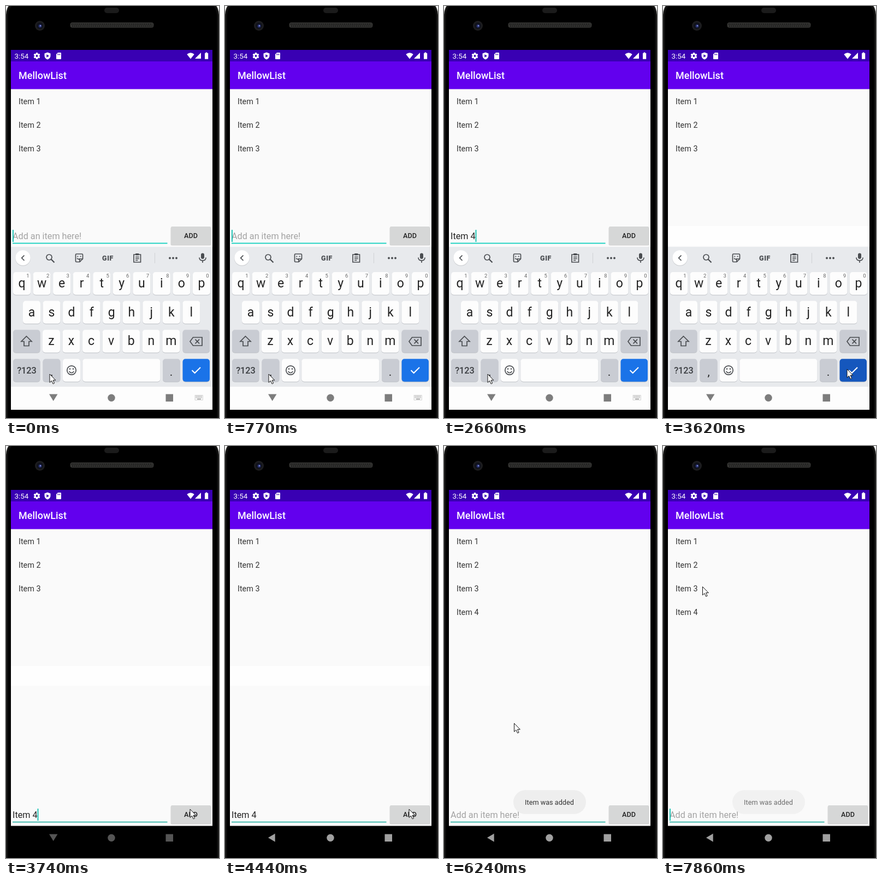
Write an HTML page that moves like this. It is 390x751 px and loops after 8 s.

```html
<!DOCTYPE html>
<html lang="en">
<head>
<meta charset="utf-8">
<title>To-do list demo</title>
<style>
  html, body { margin: 0; width: 100%; height: 100%; overflow: hidden; background: #000; }
  svg { display: block; width: 390px; height: 751px; font-family: Roboto, "Open Sans", sans-serif; }
  text { white-space: pre; }
  .mid { text-anchor: middle; }
  .line { fill: none; stroke: #4a4d51; stroke-width: 1.7; }
</style>
</head>
<body>
<svg id="stage" viewBox="0 0 390 751"></svg>
<script>
const LOOP = 8000;
const FIELD_DROP = 253;

const rect = (x, y, w, h, fill, extra = '') =>
  `<rect x="${x}" y="${y}" width="${w}" height="${h}" fill="${fill}" ${extra}/>`;
const circle = (x, y, r, fill, extra = '') =>
  `<circle cx="${x}" cy="${y}" r="${r}" fill="${fill}" ${extra}/>`;
const path = (d, extra = 'class="line"') => `<path d="${d}" ${extra}/>`;
const text = (x, y, size, fill, str, extra = '') =>
  `<text x="${x}" y="${y}" font-size="${size}" fill="${fill}" ${extra}>${str}</text>`;
const group = (id, body, extra = '') => `<g id="${id}" ${extra}>${body}</g>`;
const MID = 'class="mid"';
const MID_BOLD = 'class="mid" font-weight="500"';

function phone() {
  return rect(0, 0, 390, 751, '#f4f4f4')
    + rect(0, -14, 390, 800, '#1f1f1d', 'rx="30"')
    + rect(1.5, -12, 387, 800, '#0c0c0c', 'rx="29"')
    + rect(4, -10, 382, 800, '#000', 'rx="28"')
    + rect(180, 3, 27, 10, '#1b1b1b', 'rx="5"')
    + circle(62, 36, 9, '#1d1d1f') + circle(62, 36, 6, '#10121c')
    + circle(62.5, 36.5, 3, '#26306e') + circle(63, 36, 1.2, '#8b93d8')
    + rect(117.5, 30, 153, 9.5, '#343432', 'rx="4"')
    + path('M120 33H268M121 36.5H269', 'stroke="#171717" stroke-width="2" stroke-dasharray="2 1.5"');
}

function statusBar() {
  const white = 'fill="#fff"';
  let teeth = '';
  for (let a = 0; a < 180; a += 60) {
    teeth += rect(54.7, 85, 3.6, 12, '#fff', `rx="1" transform="rotate(${a} 56.5 91)"`);
  }
  return rect(9, 80, 369, 21, '#3900b3')
    + text(15.5, 95.6, 13.4, '#fff', '3:54')
    + teeth + circle(56.5, 91, 4.2, '#fff') + circle(56.5, 91, 1.9, '#3900b3')
    + path('M76 84.5L81.5 86.6V90.5C81.5 94 79 96.5 76 97.5C73 96.5 70.5 94 70.5 90.5V86.6Z', white)
    + path('M74.3 88.2L79 91L74.3 93.8Z', 'fill="#3900b3"')
    + path('M95 85H100Q101 85 101 86V96Q101 97 100 97H93Q92 97 92 96V88Z', white)
    + path('M94.7 87V89.5M96.7 87V89.5M98.7 87V89.5', 'stroke="#3900b3"')
    + path('M331.3 88Q338 82.5 344.7 88L338 96.5Z', white)
    + path('M357 85V96H346Z', white)
    + path('M364 86H365.5V84.5H368.5V86H370.2V96.7H364Z', white);
}

function appScreen() {
  const items = [1, 2, 3, 4].map(n =>
    text(23, 135.5 + 43 * n, 14.4, '#333', 'Item ' + n, `id="item${n}"`)).join('');
  return rect(9, 101, 369, 591.5, '#fafafa') + rect(9, 101, 369, 50.5, '#6200ee')
    + text(23, 133, 18, '#fff', 'MellowList', 'font-weight="500"')
    + group('strip', rect(9, 401, 369, 36, '#fefefe'))
    + items;
}

function entryField() {
  return group('field',
    text(12, 425, 16.2, '#a3a3a3', 'Add an item here!', 'id="hint"')
    + text(12, 425, 16.2, '#222', '', 'id="entry"')
    + rect(12, 426.6, 32.5, 1, '#333', 'id="composing"')
    + rect(12, 431.6, 283.5, 1.8, '#10cfbd', 'id="underline"')
    + rect(12, 408, 1.8, 22, '#0bbfae', 'id="caret"')
    + rect(301.5, 403, 74, 33.6, '#c4c4c4', 'rx="2.5" opacity=".7"')
    + rect(302, 402, 73, 33, '#d6d7d7', 'rx="2" id="addButton"')
    + text(338.5, 423, 12.6, '#222', 'ADD', MID_BOLD));
}

function key(x, y, w, fill, id = '') {
  return rect(x, y + 1, w, 41.5, '#bfc2c7', 'rx="5"')
    + rect(x, y, w, 41.5, fill, `rx="5" ${id && `id="${id}"`}`);
}

function letterRow(letters, x0, y, numbered) {
  return [...letters].map((ch, i) => {
    const x = x0 + 36.55 * i;
    return key(x, y, 32, '#fdfdfd')
      + text(x + 16, y + 28, 23, '#222', ch, MID)
      + (numbered ? text(x + 27, y + 10.3, 9.5, '#666', (i + 1) % 10, MID) : '');
  }).join('');
}

function toolbar() {
  return group('tools',
    path('M33.5 454.5L28.7 459.3L33.5 464')
    + circle(79, 458, 5, 'none', 'class="line"') + path('M82.7 461.7L88.5 467.5', 'class="line" style="stroke-width:2.2"')
    + path('M127.5 453.5Q127.5 452 129 452H139Q140.5 452 140.5 453.5V461L135 466.5H129Q127.5 466.5 127.5 465ZM140 461H135V466M130.3 459.5Q132 463 135.5 460.5')
    + circle(131.3, 456.5, 1.1, '#4a4d51') + circle(136.6, 456.5, 1.1, '#4a4d51')
    + text(186.5, 463.6, 12.5, '#4a4d51', 'GIF', 'class="mid" font-weight="900" letter-spacing=".6"')
    + path('M234 453H246.5V467H234ZM237 457.5H243.7M237 460.5H243.7M237 463.5H241.5')
    + rect(237, 451, 6.5, 3.6, '#4a4d51', 'rx="1"')
    + rect(272, 450, 1, 19, '#cfd1d5')
    + [300, 306, 312].map(x => circle(x, 459.5, 1.9, '#4a4d51')).join(''))
    + group('words',
      path('M28.7 454.5L33.5 459.3L28.7 464')
      + [90, 192, 294].map((x, i) => text(x, 465.5, 15.8, '#54575b', '', `${MID} id="word${i}"`)).join('')
      + rect(138, 448, 1, 22, '#c3c6ca') + rect(246, 448, 1, 22, '#c3c6ca'));
}

function keyboard() {
  const grey = '#c9ccd3';
  const mic = rect(357, 450.5, 6, 10.5, '#4a4d51', 'rx="3"')
    + path('M354 458.5Q354 464 360 464T366 458.5M360 464V468');
  const icons = path('M37.5 602L47 611.5H42V619.5H33V611.5H28Z')
    + path('M337 611.5L342.5 604H359V619H342.5ZM346.5 607.7L354 615.3M354 607.7L346.5 615.3')
    + circle(120, 664, 8.2, 'none', 'class="line"')
    + circle(117, 661.5, 1.3, '#4a4d51') + circle(123, 661.5, 1.3, '#4a4d51')
    + path('M115.5 666Q120 671.5 124.5 666')
    + path('M340.5 664L345.6 669L356 658.7', 'fill="none" stroke="#fff" stroke-width="2"');
  return group('keyboard',
    rect(9, 439, 369, 255, '#e8eaed')
    + circle(31, 460, 14, '#cfd1d4') + circle(31, 459, 13.7, '#fff')
    + toolbar() + mic
    + letterRow('qwertyuiop', 13, 485, true)
    + letterRow('asdfghjkl', 31, 537.5)
    + letterRow('zxcvbnm', 67, 590.3)
    + key(13, 590.3, 49.5, grey) + key(323.5, 590.3, 49.5, grey)
    + key(13, 643.3, 49.5, grey) + key(67.5, 643.3, 32, grey)
    + key(104, 643.3, 32, '#fdfdfd') + key(140.3, 643.3, 142, '#fdfdfd')
    + key(287, 643.3, 32, grey) + key(323.5, 643.3, 49.5, '#1a73e8', 'done')
    + text(38, 669.7, 16.3, '#3a3d41', '?123', MID_BOLD)
    + text(83.5, 673.5, 21, '#222', ',', MID) + text(302.5, 674, 21, '#222', '.', MID)
    + icons
    + rect(9, 694, 369, 42, '#fdfdfd'));
}

function navBar() {
  const dots = [711.3, 713.8].map(y =>
    path(`M347.5 ${y}H359`, 'stroke="#8a8a8a" stroke-width="1.3" stroke-dasharray="1.5 .9"')).join('');
  return group('nav',
    path('M79 707.5H94.5L86.7 720Z', 'id="navDown"')
    + path('M91.7 706.5V721.5L79 714Z', 'id="navBack"')
    + '<circle cx="193" cy="714.2" r="6.7"/><rect x="292.5" y="707.5" width="13.5" height="13.5"/>')
    + group('imeIcon', dots + path('M350 716.5H357', 'stroke="#8a8a8a" stroke-width="1.3"')
      + path('M346 709.5H360.3V718.3H346Z', 'fill="none" stroke="#c8c8c8" stroke-width=".8"'));
}

function toast() {
  return group('toast', rect(127, 627.3, 133, 43.5, '#eee', 'rx="21.7"')
    + text(193, 654, 12.7, '#333', 'Item was added', MID));
}

const pointer = group('pointer',
  path('M.5 .5V15.8L4 12.6L6.6 18.3L9.1 17.2L6.6 11.6H11.3Z', 'fill="#fff" stroke="#111" stroke-width="1"'));

document.getElementById('stage').innerHTML =
  phone() + statusBar() + appScreen() + keyboard() + entryField() + navBar() + toast() + pointer;

// Each step changes only the listed parts; the rest carries over.
const steps = [
  [0, { entry: '', composing: 0, caret: 1, words: null, field: 1, low: 0, keys: 1, ime: 1, done: 0,
        back: 0, strip: 0, press: 0, added: 0, toast: 0, at: [79.5, 670.5] }],
  [120, { caret: 0 }],
  [650, { caret: 1 }],
  [790, { entry: 'I', composing: 1, words: ['I', "I'm", 'It'] }],
  [930, { entry: 'It' }],
  [1070, { words: ['It', "It's", 'Its'] }],
  [1380, { entry: 'Ite', words: ['Ite', 'Item', "It's"] }],
  [1530, { entry: 'Item' }],
  [1680, { words: ['Items', 'Item', 'Itemize'] }],
  [1810, { entry: 'Item ', composing: 0 }],
  [1950, { words: ['is', 'in', 'of'] }],
  [2260, { entry: 'Item 4' }],
  [2390, { words: null }],
  [2760, { caret: 0, at: [102, 670] }],
  [2880, { at: [166, 667] }],
  [3000, { at: [248, 664] }],
  [3120, { at: [318, 662] }],
  [3230, { caret: 1, at: [336.5, 661.5] }],
  [3500, { done: 1 }],
  [3620, { field: 0, ime: 0, strip: 1 }],
  [3740, { field: 1, low: 1, keys: 0, done: 0 }],
  [3890, { back: 1 }],
  [4170, { caret: 0 }],
  [4480, { at: [333, 664] }],
  [4600, { at: [321, 668] }],
  [4700, { caret: 1, at: [303, 673] }],
  [4800, { at: [283, 677] }],
  [4900, { at: [266, 680] }],
  [5000, { at: [255, 681] }],
  [5100, { at: [251.5, 681] }],
  [5390, { at: [284, 677] }],
  [5530, { at: [322, 672] }],
  [5680, { press: 1, at: [331, 670] }],
  [5820, { press: 0, added: 1, entry: '', caret: 1, strip: 0 }],
  [5960, { toast: 0.6, at: [282, 628] }],
  [6100, { toast: 1, at: [180, 546] }],
  [6240, { caret: 0, at: [128, 505] }],
  [6390, { at: [126, 442] }],
  [6510, { at: [106, 344] }],
  [6630, { caret: 1, at: [82, 274] }],
  [6750, { at: [72, 256] }],
  [7150, { caret: 0 }],
  [7740, { caret: 1, toast: 0.9 }],
  [7860, { toast: 0.7 }],
];

const el = {};
document.querySelectorAll('[id]').forEach(node => { el[node.id] = node; });
const show = (node, on) => node.setAttribute('visibility', on ? 'inherit' : 'hidden');
const fill = (node, color) => node.setAttribute('fill', color);

function render(s) {
  show(el.field, s.field);
  el.field.setAttribute('transform', `translate(0 ${s.low ? FIELD_DROP : 0})`);
  show(el.hint, !s.entry);
  el.entry.textContent = s.entry;
  const width = s.entry ? el.entry.getComputedTextLength() : 0;
  show(el.composing, s.composing);
  el.composing.setAttribute('width', width);
  show(el.caret, s.caret);
  el.caret.setAttribute('x', 12 + width);
  fill(el.underline, s.low ? '#35b5a8' : '#10cfbd');
  fill(el.addButton, s.press ? '#c2c3c3' : '#d6d7d7');

  show(el.keyboard, s.keys);
  show(el.tools, !s.words);
  show(el.words, s.words);
  (s.words || []).forEach((word, i) => { el['word' + i].textContent = word; });
  fill(el.done, s.done ? '#1557bd' : '#1a73e8');

  show(el.imeIcon, s.ime);
  show(el.navDown, !s.back);
  show(el.navBack, s.back);
  fill(el.nav, s.keys ? '#7d7d7d' : s.back ? '#a0a0a0' : '#555');

  show(el.strip, s.strip);
  show(el.item4, s.added);
  el.toast.setAttribute('opacity', s.toast);
  el.pointer.setAttribute('transform', `translate(${s.at})`);
}

let shown = -1;
function tick() {
  const time = performance.now() % LOOP;
  const count = steps.filter(([start]) => start <= time).length;
  if (count !== shown) {
    render(Object.assign({}, ...steps.slice(0, count).map(([, change]) => change)));
    shown = count;
  }
  requestAnimationFrame(tick);
}
tick();
</script>
</body>
</html>
```
